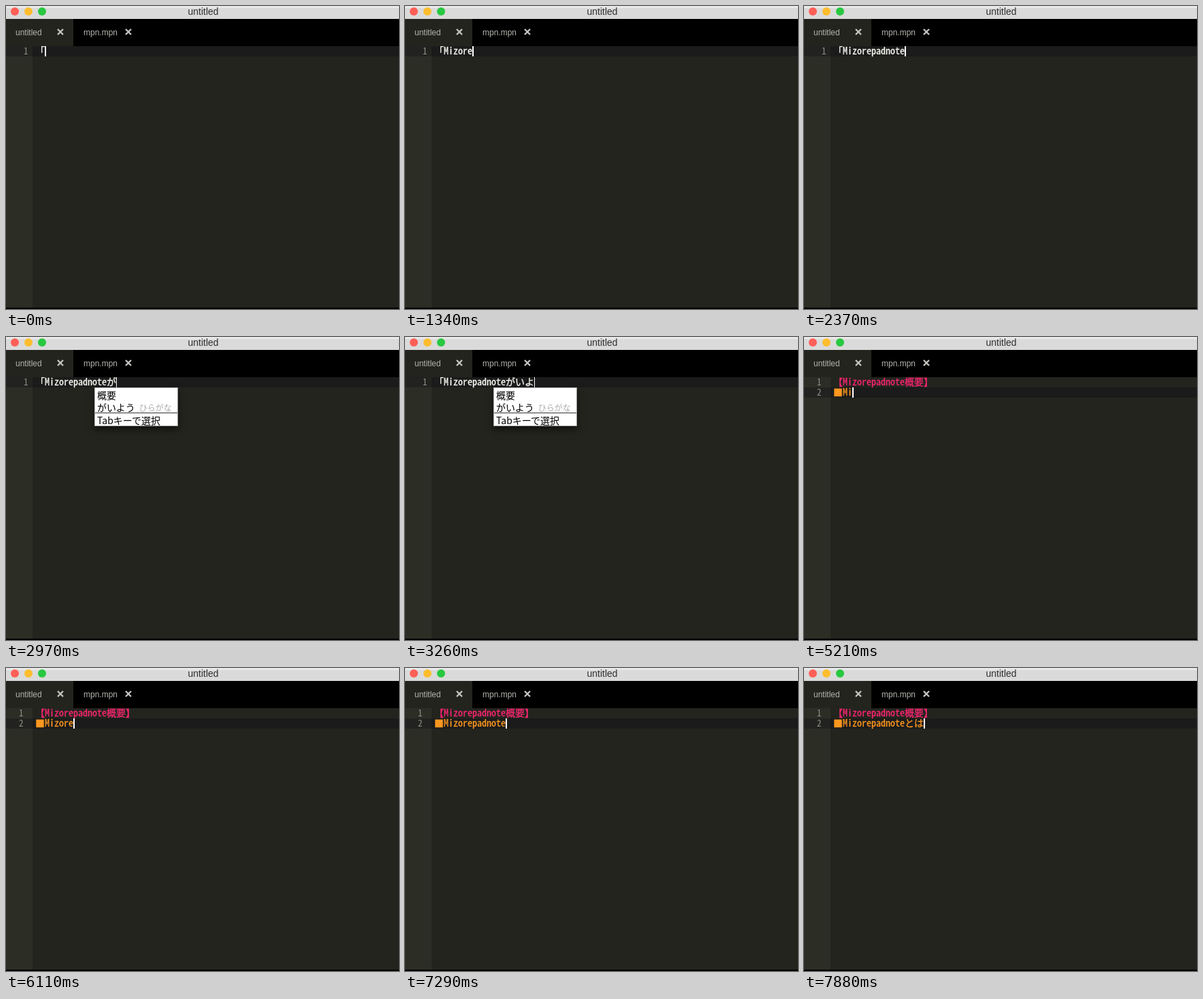
Animation, 578 px wide and 445 px high, one loop 8000 ms. Source, as an HTML page:

```html
<!DOCTYPE html>
<html lang="ja">
<head>
<meta charset="utf-8">
<title>Editor</title>
<style>
html, body { margin: 0; width: 100%; height: 100%; overflow: hidden; background: #000; }
div, svg { position: absolute; top: 0; left: 0; box-sizing: border-box; white-space: pre; }
#stage { width: 578px; height: 445px; overflow: hidden; background: #000; font: 12px "Liberation Sans", Arial, sans-serif; }
#title { width: 578px; height: 19px; background: linear-gradient(#e9e9e9 3px, #dadada 3px); color: #2e2e2e;
  font-size: 14px; line-height: 17px; text-align: center; padding-left: 2px; }
.light { top: 2px; width: 12px; height: 12px; border-radius: 50%; }
.tab { top: 19px; height: 40px; line-height: 40px; color: #b4b4ae; }
#active { width: 99px; padding-left: 14px; background: #23241e; }
#other { left: 114px; }
#editor { top: 59px; width: 578px; height: 384px; background: linear-gradient(90deg, #2c2e26 39px, #23241e 39px); }
#current { width: 578px; height: 15px; background: linear-gradient(90deg, #222320 39px, #1b1b1b 39px); }
.line, .number { top: -1px; height: 15px; font: 14px/15px "Noto Sans Mono CJK JP", "Noto Sans Mono CJK", "Noto Sans CJK JP", "Noto Sans Mono", monospace; }
.second { top: 14px; }
.line { left: 43px; -webkit-text-stroke: .3px; }
.number { font-size: 13px; color: #90918b; }
#line2 { color: #fd971f; }
#caret { height: 15px; background: #fff; }
#popup { left: 130px; width: 123px; height: 57px; background: #fff; border: 1px solid #aaa; color: #000;
  font: 14px/18px "Noto Sans CJK JP", "Noto Sans CJK", sans-serif; box-shadow: 0 5px 10px #0008; }
.row { left: 3px; }
.row small { font-size: 12px; color: #aaa; margin-left: 6px; }
#rule { top: 36px; width: 121px; height: 1px; background: #333; }
</style>
</head>
<body>
<div id="stage">
  <div id="title">untitled</div>
  <div class="light" style="left:7px;background:#ff5f57"></div>
  <div class="light" style="left:27px;background:#ffbd2e"></div>
  <div class="light" style="left:47px;background:#28c840"></div>
  <div class="tab" id="active">untitled</div>
  <div class="tab" id="other">mpn.mpn</div>
  <svg width="200" height="59" stroke="#c4c4c0" stroke-width="2.4">
    <path d="M76 34l8 8m0-8l-8 8M176 34l8 8m0-8l-8 8"/>
  </svg>
  <div id="editor">
    <div id="current"></div>
    <div class="number" id="number1">1</div>
    <div class="number second" id="number2">2</div>
    <div class="line" id="line1"></div>
    <div class="line second" id="line2"></div>
    <div id="caret"></div>
    <div id="popup">
      <div class="row" id="candidate" style="top:1px"></div>
      <div class="row" style="top:19px"><span id="reading"></span><small>ひらがな</small></div>
      <div id="rule"></div>
      <div class="row" style="top:38px">Tabキーで選択</div>
    </div>
  </div>
</div>
<script>
const LOOP = 8000, KEY = 147, SLACK = 8;
const NAME = "Mizorepadnote", KANA = "がいよう";
const el = id => document.getElementById(id);

// Keys pressed by time t in a burst of n evenly spaced strokes
const keys = (t, start, n) => Math.max(0, Math.min(n, Math.floor((t - start + SLACK) / KEY) + 1));
const typed = (t, bursts) => NAME.slice(0, bursts.reduce((sum, [start, n]) => sum + keys(t, start, n), 0));
// Half-width letters take 7px, full-width characters 14px
const textWidth = s => [...s].reduce((w, c) => w + (c < "\u0100" ? 7 : 14), 0);

function editorState(t) {
  const kana = keys(t, 2970, 5), second = t >= 4460, heading = t >= 4160;
  const ending = kana === 5 ? "概要" : KANA.slice(0, kana);
  const name1 = typed(t, [[600, 8], [1780, 5]]);
  const name2 = typed(t, [[5060, 2], [5510, 1], [5810, 5], [6700, 5]]);
  const tail = keys(t, 7740, 2);
  return {
    second, heading,
    line1: heading ? `【${name1}概要】` : "「" + name1 + ending,
    line2: second ? "■" + name2 + "とは".slice(0, tail) : "",
    composing: (kana > 0 && kana < 5) || tail === 1
  };
}

function render(t) {
  const { second, heading, line1, line2, composing } = editorState(t);
  const row = second ? 15 : 0;
  el("line1").textContent = line1;
  el("line1").style.color = heading ? "#f92672" : "#f8f8f2";
  el("line2").textContent = line2;
  el("number1").style.left = el("number2").style.left = (second ? 19 : 26) + "px";
  el("number2").hidden = !second;
  el("current").style.top = row + "px";
  el("caret").style.cssText =
    `top:${row}px;left:${43 + textWidth(second ? line2 : line1)}px;width:${composing ? 1 : 2}px`;
  el("popup").hidden = !composing;
  el("popup").style.top = row + 15 + "px";
  el("candidate").textContent = second ? "とは" : "概要";
  el("reading").textContent = second ? "とは" : KANA;
}

const begin = performance.now();
(function tick() {
  render((performance.now() - begin) % LOOP);
  requestAnimationFrame(tick);
})();
</script>
</body>
</html>
```
